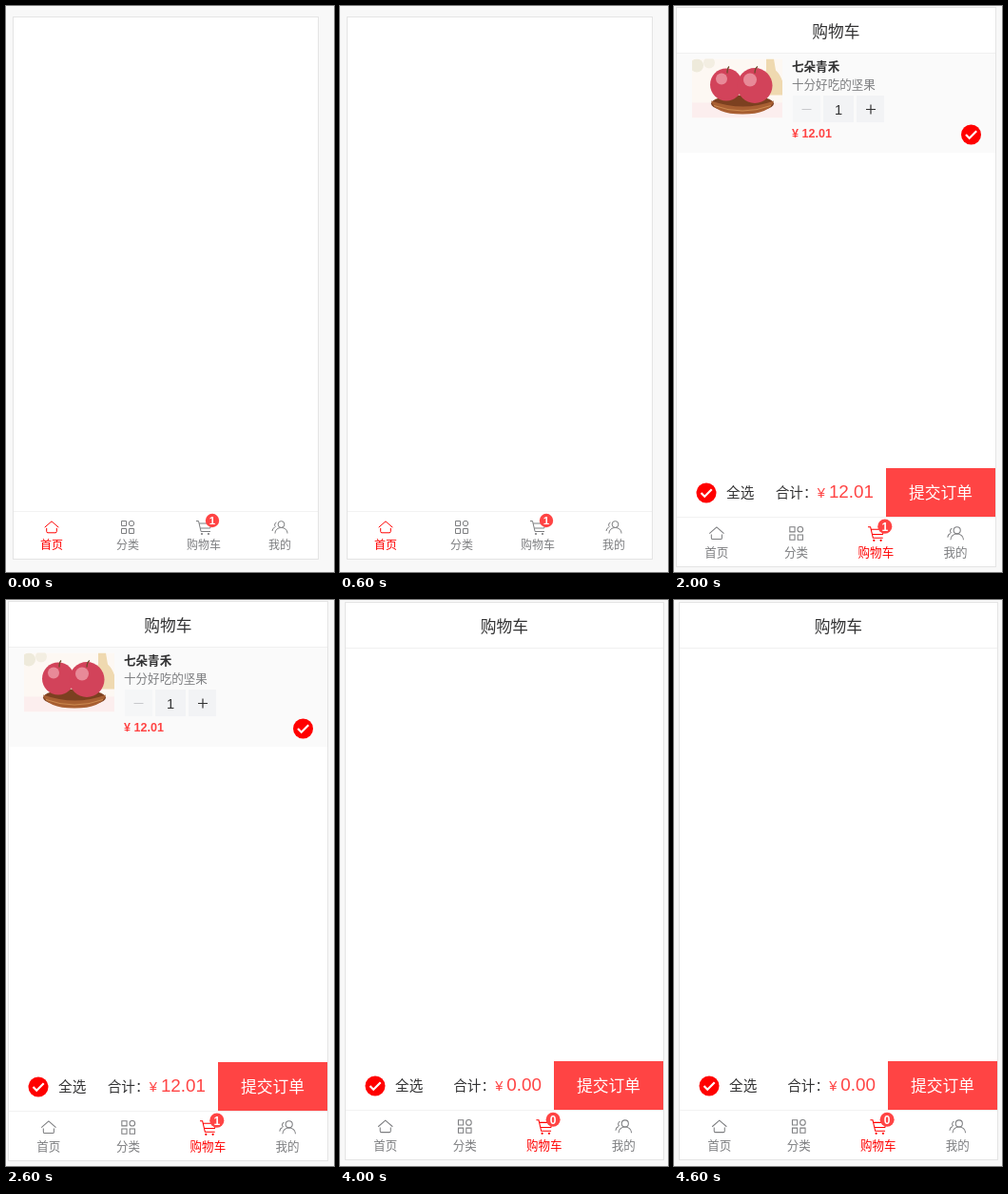
An HTML page for the animation above (5 s loop, 345 px wide and 594 px high).

```html
<!DOCTYPE html>
<html lang="zh-CN">
<head>
<meta charset="utf-8">
<title>购物车</title>
<style>
html, body { margin: 0; width: 100%; height: 100%; overflow: hidden; background: #f8f8f8; }
#stage { display: block; width: 345px; height: 594px; }
text { font-family: "Liberation Sans", Arial, "Noto Sans CJK SC", "Noto Sans CJK", sans-serif; white-space: pre; }
</style>
</head>
<body>
<svg id="stage" viewBox="0 0 345 594"></svg>
<script>
const SCALE = 1.047, SMALL = 12 * SCALE, BODY = 14 * SCALE, LARGE = 16 * SCALE;
const DARK = '#323233', GREY = '#7d7e80', RED = '#f00', CORAL = '#f44';
const BRAND = '七朵青禾';

const rect = (x, y, w, h, fill, extra = '') =>
  `<rect x="${x}" y="${y}" width="${w}" height="${h}" fill="${fill}" ${extra}/>`;
const circle = (x, y, r, fill, extra = '') =>
  `<circle cx="${x}" cy="${y}" r="${r}" fill="${fill}" ${extra}/>`;
const path = (d, stroke, width, extra = '') =>
  `<path d="${d}" fill="none" stroke="${stroke}" stroke-width="${width}" ${extra}/>`;
const shape = (d, fill) => `<path d="${d}" fill="${fill}"/>`;
const at = (x, y, body, scale = 1) =>
  `<g transform="translate(${x} ${y}) scale(${scale})">${body}</g>`;
// y is the vertical middle of the glyphs
const text = (x, y, str, size, fill, extra = '') =>
  `<text x="${x}" y="${y + size * 0.37}" font-size="${size}" fill="${fill}" ${extra}>${str}</text>`;
const middle = 'text-anchor="middle"', bold = 'font-weight="bold"';

const homeIcon = c => path('M-7.3.2L0-6.2L7.3.2M-5.3 1V4.5q0 1.3 1.3 1.3H4q1.3 0 1.3-1.3V1', c, 1, 'stroke-linejoin="round"');
const gridIcon = c => path('M-6.5-6.5h5v5h-5zM-6.5 1.5h5v5h-5zM1.5 1.5h5v5h-5z', c, 1) +
  circle(4, -4, 2.7, 'none', `stroke="${c}"`);
const cartIcon = c => path('M-8-6.5h2.5l2.6 11H7M-4.8-4H8L6.8 1H-3.5', c, 1) +
  circle(-2, 7, 1.1, c) + circle(5, 7, 1.1, c);
const userIcon = c => circle(1.5, -3, 3.4, 'none', `stroke="${c}"`) +
  path('M-5 6.5C-5-1.5 8-1.5 8 6.5M-3.5-5a2.6 2.6 0 0 0-.8 4.6M-8 4q.3-3 2.8-4', c, 1);
const tabs = [['首页', homeIcon], ['分类', gridIcon], ['购物车', cartIcon], ['我的', userIcon]];

function tabBar(w, h, active, count) {
  const k = w / 320, top = Math.round(h - 50 * k);
  const items = tabs.map(([label, icon], i) => {
    const x = w * (2 * i + 1) / 8, c = i === active ? RED : GREY;
    return at(x, h - 33 * k, icon(c), k) + text(x, h - 14 * k, label, 12 * k, c, middle);
  });
  const bx = w * 5 / 8 + 9 * k, by = h - 40 * k;
  return rect(0, top, w, 60, '#fff') + rect(0, top, w, 1, '#f2f2f2') + items.join('') +
    circle(bx, by, 7.2 * k, CORAL) + text(bx, by, count, 11.5 * k, '#fff', middle + ' ' + bold);
}

const header = (w, title) => text(w / 2, 24.5, title, LARGE, DARK, middle) + rect(0, 47, w, 1, '#f0f0f0');

const apples = (x, y) => `<svg x="${x}" y="${y}" width="95" height="62">` +
  rect(0, 0, 95, 62, '#fdf8f3') + rect(0, 46, 95, 16, '#fceeee') +
  circle(5, 7, 7, '#eeeadb') + circle(18, 4, 6, '#f3eee2') +
  shape('M78 0h8l2 12q9 8 9 26H74q-1-18 4-26z', '#efd9b0') +
  '<ellipse cx="53" cy="47" rx="33" ry="9" fill="#7c4020"/>' +
  circle(36, 27, 17, '#d2435a') + circle(66, 28, 18.5, '#d2435a') +
  circle(31, 21, 6, '#e88a98') + circle(61, 22, 7, '#e88a98') +
  path('M37 15q0-5 2-7M66 15q0-5 3-7', '#6b4a2a', 1.3) +
  shape('M20 44Q54 56 86 44Q82 58 53 58Q24 58 20 44z', '#a85f32') +
  path('M23 49Q53 60 83 49', '#cc8a50', 1) + '</svg>';

const bananas = (x, y) => at(x, y, rect(0, 0, 95, 86, '#fff') +
  shape('M34 13Q76 2 93 42L86 48Q70 24 34 13z', '#e6bd24') +
  shape('M18 18Q62 8 92 44L85 52Q62 36 18 18z', '#f4d23c') +
  shape('M4 30Q42 16 90 47L80 54Q40 52 4 30z', '#e9c028') +
  shape('M3 34Q36 32 86 50L72 57Q30 60 3 34z', '#f6d742') +
  shape('M10 47Q34 46 76 53L62 59Q30 64 10 47z', '#e2b824') +
  shape('M83 40L94 40V54L80 53z', '#6f5a20') +
  circle(4, 32, 1.6, '#5c4a20') + circle(11, 47, 1.6, '#5c4a20') +
  path('M38 66Q58 52 79 69', '#f7e3a6', 13, 'stroke-linecap="round"') +
  [[35, 70], [48, 76], [66, 75]].map(([a, b]) =>
    circle(a, b, 7.5, '#faeec2', 'stroke="#e6cb78"') + circle(a, b, 2.8, '#ecd896')).join(''));

function product(y, picture, name, note, price, old) {
  return rect(67, y, 268, 126, '#fafafa') + picture(83, y + 4) +
    shape(`M83 ${y + 6}h29a10.5 10.5 0 0 1 0 21H83z`, CORAL) +
    text(89, y + 16.5, '标签', 13, '#fff') +
    text(187, y + 12, name, SMALL, DARK, bold) +
    text(187, y + 31, note, SMALL, GREY) +
    text(187, y + 51.5, `${price}<tspan dx="5" font-weight="normal" fill="${GREY}" text-decoration="line-through">${old}</tspan>`, SMALL, CORAL, bold) +
    circle(308.5, y + 107, 9, 'none', `stroke="${CORAL}" stroke-width="1.4"`) +
    at(308.5, y + 107, shape('M-4.8-4H8L6.8 1H-3.5z', CORAL) + cartIcon(CORAL), 0.62);
}

function category(w, h) {
  const side = ['热卖', '水果', '零食', '数码', '水果', '零食', '数码', '水果'];
  let out = rect(0, 109, 67, 430, '#f8f8f8') + rect(0, 49, 3, 60, CORAL);
  side.forEach((label, i) => out += text(13, 78.5 + 60.9 * i, label, BODY, i ? GREY : DARK));
  for (let i = 0; i < 5; i++)
    out += text(78 + 58.7 * i, 71.5, '热卖' + (i + 1), BODY, i ? GREY : DARK);
  return rect(0, 0, w, h, '#fcfcfc') + header(w, '分类') + out + rect(82, 91, 29, 3, CORAL, 'rx="1"') +
    product(105, apples, BRAND, '十分好吃的坚果', '¥ 12.01', '¥ 10.00') +
    product(242, bananas, '苹果', '十分好吃的水果', '¥ 13.2', '¥ 10.00');
}

const check = (x, y) => circle(x, y, 10.5, RED) + at(x, y, path('M-5.5 0L-1.8 3.7L5.7-3.7', '#fff', 2.2));

const cartItem = dx => rect(0, 48, 335, 104, '#fafafa') + at(dx, 0,
  apples(16, 53.5) +
  text(121, 61, BRAND, SMALL, DARK, bold) +
  text(121, 80, '十分好吃的坚果', SMALL, GREY) +
  rect(122, 92, 29, 28, '#f5f6f7') + rect(154, 92, 32, 28, '#f2f3f5') + rect(189, 92, 29, 28, '#f2f3f5') +
  path('M131.5 106.5h10', '#c8c9cc', 1) + path('M199 106.5h10M204 101.5v10', DARK, 1.2) +
  text(170, 106.5, '1', BODY, DARK, middle) +
  text(121, 131.5, '¥ 12.01', SMALL, CORAL, bold) +
  check(309.5, 133));

function submitBar(w, h, total) {
  const top = Math.round(h - 50 * w / 320) - 51, y = top + 26;
  return check(31, y) + text(52, y, '全选', BODY, DARK) +
    text(w - 128, y, `合计：<tspan fill="${CORAL}">¥ <tspan font-size="${18 * SCALE}">${total}</tspan></tspan>`, BODY, DARK, 'text-anchor="end"') +
    rect(w - 115, top, 115, 51, CORAL) + text(w - 57.5, y, '提交订单', LARGE, '#fff', middle);
}

const cart = (w, h, total, item = '') => header(w, '购物车') + item + submitBar(w, h, total);
const removeButton = w => rect(w - 68, 48, 68, 103, RED) + text(w - 34, 101, '删除', LARGE, '#fff', middle);

const scenes = [
  { box: [8, 12, 320, 568], tab: 0, count: 1, body: () => '' },
  { box: [4, 2, 335, 587], tab: 1, count: 1, body: category },
  { box: [3, 2, 335, 586], tab: 2, count: 1, body: (w, h) => cart(w, h, '12.01', cartItem(0)) },
  { box: [4, 2, 334, 585], tab: 2, count: 1, body: (w, h) => cart(w, h, '12.01', cartItem(-69) + removeButton(w)) },
  { box: [6, 3, 334, 584], tab: 2, count: 0, body: (w, h) => cart(w, h, '0.00') }
];

function render({ box: [x, y, w, h], tab, count, body }) {
  return rect(x, y, w, h, '#fff') +
    `<svg x="${x}" y="${y}" width="${w}" height="${h}">${body(w, h)}${tabBar(w, h, tab, count)}</svg>` +
    rect(x - 0.5, y - 0.5, w + 1, h + 1, 'none', 'stroke="#e4e4e4"');
}

const stage = document.getElementById('stage');
const start = performance.now();
let shown = -1;
function tick() {
  const index = Math.floor((performance.now() - start) / 1000) % scenes.length;
  if (index !== shown) stage.innerHTML = render(scenes[shown = index]);
  requestAnimationFrame(tick);
}
tick();
</script>
</body>
</html>
```
